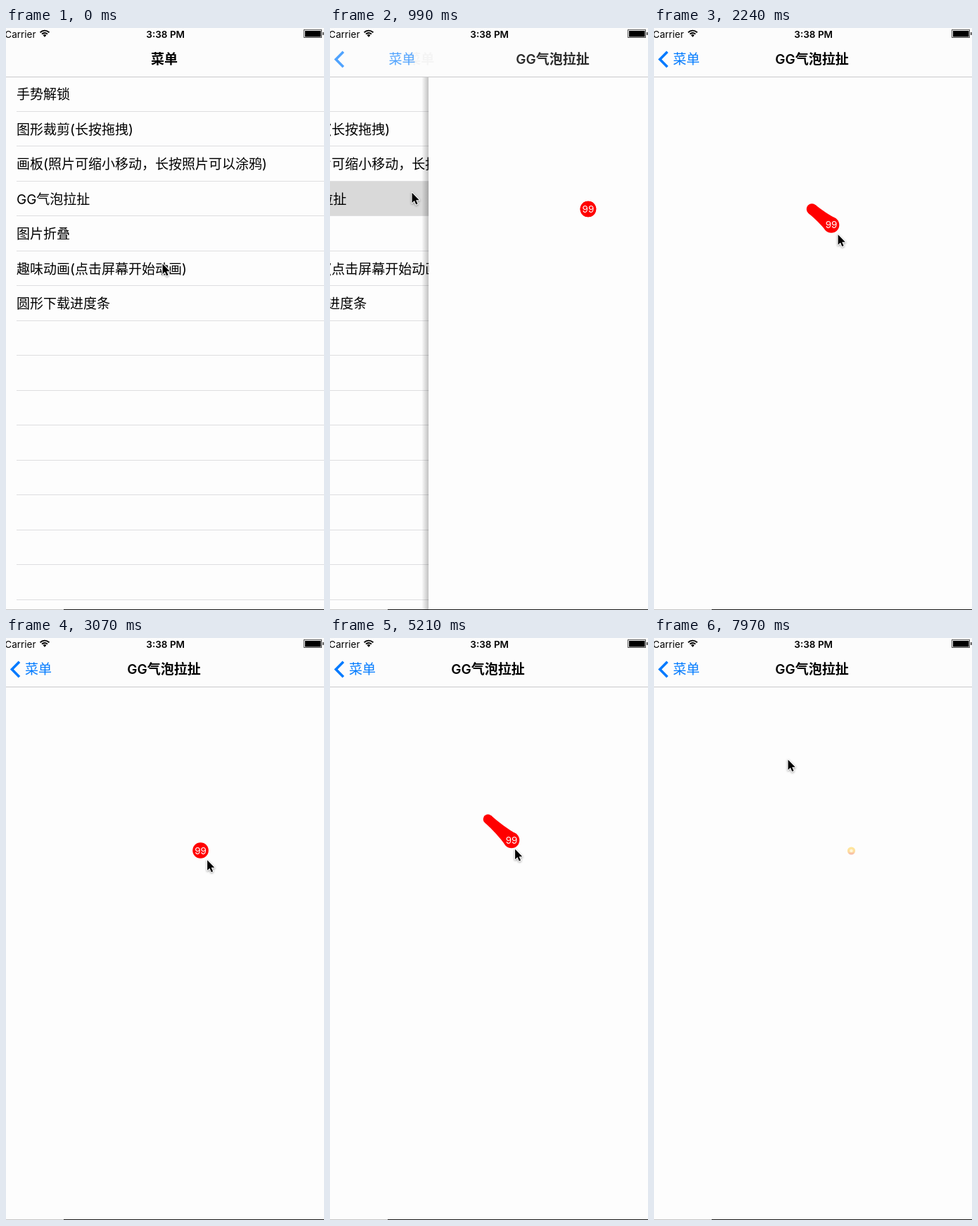
An HTML page with a canvas that plays this animation: 452x826 px, repeating every 8000 ms.

```html
<!DOCTYPE html>
<html lang="zh-CN">
<head>
<meta charset="utf-8">
<style>
  html, body { margin: 0; width: 100%; height: 100%; overflow: hidden; background: #fdfdfd; }
  canvas { display: block; }
</style>
</head>
<body>
<canvas id="stage" width="452" height="826"></canvas>
<script>
const W = 452, H = 826, LOOP = 8000;
const ctx = document.getElementById('stage').getContext('2d');
const FONT = "Inter, 'Noto Sans CJK SC', 'Noto Sans CJK', sans-serif";
const PAPER = '#fdfdfd', BLUE = '#007aff', RED = '#ff0000';
const HOME = { x: 224.5, y: 257 }, RADIUS = 11.3;
const NAV = 69, ROW = 49.5, PRESSED = 3;
const MENU = '菜单', PAGE = 'GG气泡拉扯';
const ROWS = ['手势解锁', '图形裁剪(长按拖拽)', '画板(照片可缩小移动，长按照片可以涂鸦)',
  PAGE, '图片折叠', '趣味动画(点击屏幕开始动画)', '圆形下载进度条'];

// Each key is [time, x, y].
const DRAG = [
  [1830, 224.5, 257], [2360, 260, 286], [2560, 260, 286], [3070, 276.5, 301.5],
  [3180, 283, 306], [3320, 283, 306], [3590, 240.5, 265.5], [3819, 240.5, 265.5],
  [3820, 224.5, 257], [4000, 224.5, 257], [4380, 256, 290], [4620, 240, 270],
  [4850, 255, 284], [5160, 255, 284], [5210, 258, 287], [5420, 258, 287],
  [5560, 261, 289], [5930, 261, 289], [6330, 231, 263], [6510, 231, 263],
  [6680, 260, 284], [6900, 280.5, 302]
];
const APPROACH = [
  [300, 222, 334], [680, 116, 233], [1150, 116, 233], [1400, 233, 255],
  [1460, 233, 255], [1690, 233.5, 270]
];
const REGRAB = [[3820, 249.5, 278.5], [3990, 229, 269]];
const LEAVE = [[7480, 285, 314], [7960, 190, 172]];

const mix = (a, b, k) => a + (b - a) * k;
const clamp = v => Math.max(0, Math.min(1, v));

function along(keys, t) {
  let i = 1;
  while (i < keys.length - 1 && t > keys[i][0]) i++;
  const a = keys[i - 1], b = keys[i];
  const k = clamp((t - a[0]) / (b[0] - a[0]));
  return { x: mix(a[1], b[1], k), y: mix(a[2], b[2], k) };
}

function cursorAt(t) {
  if (t < 1830) return along(APPROACH, t);
  if (t >= 3820 && t < 4000) return along(REGRAB, t);
  if (t >= 7440) return along(LEAVE, t);
  const p = along(DRAG, t);
  return t < 3820 ? { x: p.x + 9, y: p.y + 13 } : { x: p.x + 4.5, y: p.y + 12 };
}

// Critically damped push with a short stall near its end.
function pushAt(t) {
  if (t >= 1080 && t < 1170) t = 1080;
  const s = 14 * Math.max(0, t - 822) / 1000;
  return t > 1650 ? 1 : 1 - (1 + s) * Math.exp(-s);
}

function text(str, x, y, { size = 19, weight = 400, color = '#000', align = 'left', alpha = 1 } = {}) {
  ctx.globalAlpha = alpha;
  ctx.font = `${weight} ${size}px ${FONT}`;
  ctx.fillStyle = color;
  ctx.textAlign = align;
  ctx.fillText(str, x, y);
  ctx.globalAlpha = 1;
}

function rect(x, y, w, h, color) {
  ctx.fillStyle = color;
  ctx.fillRect(x, y, w, h);
}

function disc(x, y, r, color) {
  ctx.fillStyle = color;
  ctx.beginPath();
  ctx.arc(x, y, r, 0, 7);
  ctx.fill();
}

function drawMenu(t, shift) {
  ctx.save();
  ctx.translate(shift, 0);
  if (t > 740) rect(-shift, 217, W, 50, '#d9d9d9');
  for (let i = 1; i <= 15; i++) {
    const y = Math.floor(NAV - 0.1 + ROW * i);
    rect(15, y, W + 140, 1, '#dedee0');
  }
  ROWS.forEach((label, i) => text(label, 15, 101 + ROW * i));
  ctx.restore();
}

function drawNeck(a, b, small, big) {
  const dx = b.x - a.x, dy = b.y - a.y, d = Math.hypot(dx, dy);
  if (d < 1) return;
  const nx = -dy / d, ny = dx / d, mx = dx / 2, my = dy / 2;
  ctx.fillStyle = RED;
  ctx.beginPath();
  ctx.moveTo(a.x + nx * small, a.y + ny * small);
  ctx.quadraticCurveTo(a.x + nx * small + mx, a.y + ny * small + my, b.x + nx * big, b.y + ny * big);
  ctx.lineTo(b.x - nx * big, b.y - ny * big);
  ctx.quadraticCurveTo(a.x - nx * small + mx, a.y - ny * small + my, a.x - nx * small, a.y - ny * small);
  ctx.fill();
}

function drawBubble(t) {
  const p = along(DRAG, t);
  const torn = (t > 2820 && t < 3820) || t > 6800;
  if (!torn) {
    const small = RADIUS - Math.hypot(p.x - HOME.x, p.y - HOME.y) / 10;
    disc(HOME.x, HOME.y, small, RED);
    drawNeck(HOME, p, small, RADIUS);
  }
  disc(p.x, p.y, RADIUS, RED);
  text('99', p.x, p.y + 5, { size: 13.5, color: '#fff', align: 'center' });
}

function drawPuff(t) {
  const k = clamp((t - 7440) / 530), x = 280.5, y = 302;
  const r = mix(11, 5.6, k);
  const fill = ctx.createLinearGradient(0, y - r, 0, y + r);
  fill.addColorStop(0, '#ffd95a');
  fill.addColorStop(0.6, '#ffc860');
  fill.addColorStop(1, '#f08070');
  ctx.globalAlpha = mix(1, 0.6, k);
  disc(x, y, r, fill);
  ctx.globalAlpha = mix(0.5, 0.8, k);
  disc(x, y, r * 0.4, '#fffbe8');
  ctx.globalAlpha = 1;
}

function drawPage(t, left) {
  const shade = ctx.createLinearGradient(left - 10, 0, left, 0);
  shade.addColorStop(0, 'rgba(0,0,0,0)');
  shade.addColorStop(1, 'rgba(0,0,0,.24)');
  rect(left - 10, NAV, 10, H, shade);
  rect(left, NAV, W + 10, H, PAPER);
  ctx.save();
  ctx.translate(left + 7 * clamp((left + 7) / 466), 0);
  if (left < -6) ctx.translate(-left, 0);
  if (t < 7440) drawBubble(t);
  else drawPuff(t);
  ctx.restore();
}

function drawStatus() {
  text('Carrier', 42.5, 13.5, { size: 13.5, align: 'right' });
  text('3:38 PM', 226.7, 13.5, { size: 13.5, weight: 600, align: 'center' });
  ctx.strokeStyle = '#000';
  ctx.lineWidth = 1.9;
  for (const r of [5.4, 8.8]) {
    ctx.beginPath();
    ctx.arc(55, 12.4, r, -Math.PI * 0.76, -Math.PI * 0.24);
    ctx.stroke();
  }
  ctx.fillStyle = '#000';
  ctx.beginPath();
  ctx.moveTo(55, 13);
  ctx.arc(55, 12.4, 3.2, -Math.PI * 0.76, -Math.PI * 0.24);
  ctx.fill();
  ctx.lineWidth = 1;
  ctx.strokeStyle = '#555';
  ctx.strokeRect(423.5, 2.5, 25, 11);
  rect(425, 4, 22.5, 8.5, '#000');
  rect(450, 6, 1.5, 4, '#333');
}

function drawNav(p) {
  rect(0, 0, W, NAV, '#fcfcfc');
  rect(0, NAV, W, 1, '#c9c9cb');
  drawStatus();
  const title = { weight: 600, align: 'center' };
  if (p < 1) text(MENU, 225 - 140 * p, 51.3, { ...title, alpha: (1 - p) ** 3 });
  if (p <= 0) return;
  text(PAGE, 224.5 + 291 * (1 - p), 51.3, { ...title, alpha: Math.sqrt(p) });
  text(MENU, 27 + 179 * (1 - p), 51.3, { color: BLUE, alpha: p });
  ctx.globalAlpha = p;
  ctx.strokeStyle = BLUE;
  ctx.lineWidth = 3.6;
  ctx.beginPath();
  ctx.moveTo(19, 33.8);
  ctx.lineTo(8.4, 44.5);
  ctx.lineTo(19, 55.2);
  ctx.stroke();
  ctx.globalAlpha = 1;
}

const ARROW = new Path2D('M0 0V14.4L3.3 11.3L5.7 16.8L8 15.8L5.6 10.4H10.2Z');

function drawCursor({ x, y }) {
  ctx.save();
  ctx.translate(x + 0.6, y + 0.8);
  ctx.lineJoin = 'round';
  ctx.lineWidth = 2;
  ctx.strokeStyle = '#fff';
  ctx.shadowColor = 'rgba(0,0,0,.4)';
  ctx.shadowBlur = 3;
  ctx.shadowOffsetY = 1;
  ctx.stroke(ARROW);
  ctx.shadowColor = 'transparent';
  ctx.fillStyle = '#000';
  ctx.fill(ARROW);
  ctx.restore();
}

function draw(t) {
  const p = pushAt(t);
  rect(0, 0, W, H, PAPER);
  if (p < 1) drawMenu(t, -140 * p);
  if (p > 0) drawPage(t, 459 - 466 * p);
  drawNav(p);
  rect(0, H - 1, 82, 1, '#c4c4c4');
  rect(82, H - 1, W - 82, 1, '#161616');
  drawCursor(cursorAt(t));
}

const start = performance.now();
function tick() {
  draw((performance.now() - start) % LOOP);
  requestAnimationFrame(tick);
}
tick();
</script>
</body>
</html>
```
